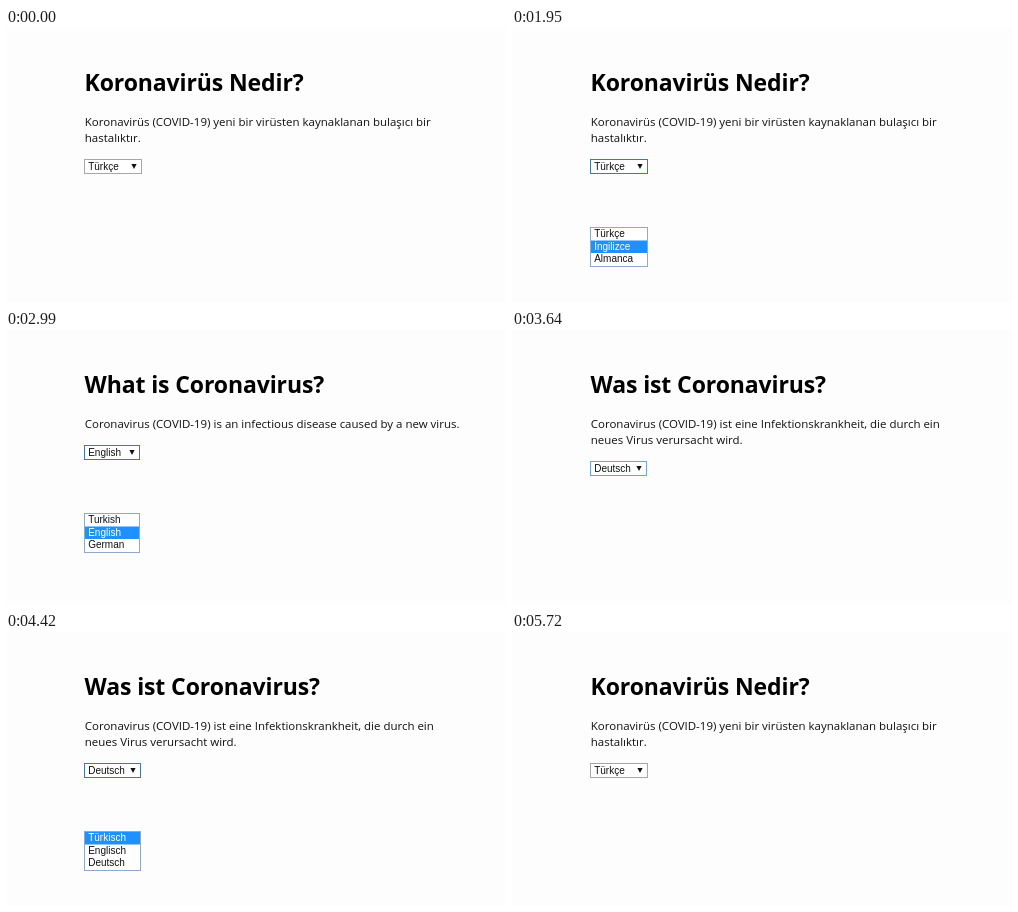
Animation, 500 px wide and 274 px high, one loop 5850 ms. Source, as an HTML page:

```html
<!DOCTYPE html>
<html lang="en">
<head>
<meta charset="utf-8">
<title>Language select</title>
<style>
html, body { margin: 0; width: 100%; height: 100%; overflow: hidden; background: #fdfdfd; }
svg { display: block; width: 500px; height: 274px; }
text { fill: #111; white-space: pre; }
.title { font: 700 23px "Open Sans", "Noto Sans", sans-serif; letter-spacing: -.11px; fill: #000; }
.body { font: 400 11.49px "Open Sans", "Noto Sans", sans-serif; }
.ui { font: 400 10px "Liberation Sans", Arial, sans-serif; }
</style>
</head>
<body>
<svg id="stage" viewBox="0 0 500 274"></svg>
<script>
const LOOP = 5850;
const PAGES = {
  tr: {
    title: 'Koronavirüs Nedir?',
    lines: ['Koronavirüs (COVID-19) yeni bir virüsten kaynaklanan bulaşıcı bir', 'hastalıktır.'],
    label: 'Türkçe', width: 57, options: ['Türkçe', 'İngilizce', 'Almanca']
  },
  en: {
    title: 'What is Coronavirus?',
    lines: ['Coronavirus (COVID-19) is an infectious disease caused by a new virus.'],
    label: 'English', width: 55, options: ['Turkish', 'English', 'German']
  },
  de: {
    title: 'Was ist Coronavirus?',
    lines: ['Coronavirus (COVID-19) ist eine Infektionskrankheit, die durch ein', 'neues Virus verursacht wird.'],
    label: 'Deutsch', width: 56, options: ['Türkisch', 'Englisch', 'Deutsch']
  }
};
const BORDER = { idle: '#a6a6a6', hover: '#595959', focus: '#6fa3e0', active: '#3f78b8' };

// [start ms, page, border, highlighted option if the list is open]
const STEPS = [
  [0, 'tr', 'idle'],
  [1300, 'tr', 'hover'],
  [1560, 'tr', 'active', 0],
  [1950, 'tr', 'active', 1],
  [2340, 'en', 'focus'],
  [2730, 'en', 'active'],
  [2860, 'en', 'active', 1],
  [3250, 'en', 'active', 2],
  [3640, 'de', 'focus'],
  [3770, 'de', 'active'],
  [4160, 'de', 'active', 2],
  [4290, 'de', 'active', 1],
  [4420, 'de', 'active', 0],
  [4810, 'tr', 'focus'],
  [5720, 'tr', 'idle']
];

const text = (cls, x, y, s, fill) =>
  `<text class="${cls}" x="${x}" y="${y}"${fill ? ` style="fill:${fill}"` : ''}>${s}</text>`;
const box = (x, y, w, h, fill, stroke = 'none') =>
  `<rect x="${x}" y="${y}" width="${w}" height="${h}" fill="${fill}" stroke="${stroke}"/>`;

function list(page, top, picked) {
  const row = 12.5;
  return box(78.5, top + .5, page.width, 39, '#fff', '#8fa9cc') +
    page.options.map((name, i) => {
      const y = top + 1 + i * row, on = i === picked;
      return (on ? box(79, y, page.width - 1, row, '#1e90ff') : '') +
        text('ui', 82.2, y + 9, name, on && '#fff');
    }).join('');
}

function draw([, key, border, picked]) {
  const page = PAGES[key];
  const top = 99 + 16 * page.lines.length;
  const ax = 78 + page.width - 7, ay = top + 5;
  return text('title', 78.5, 63, page.title) +
    page.lines.map((s, i) => text('body', 78.8, 98 + 16 * i, s)).join('') +
    box(78.5, top + .5, page.width, 14, '#fff', BORDER[border]) +
    text('ui', 82.2, top + 11, page.label) +
    `<path d="M${ax - 2.6} ${ay}h5.2l-2.6 5z" fill="#111"/>` +
    (picked === undefined ? '' : list(page, top + 68, picked));
}

const stage = document.getElementById('stage');
let shown;
function tick(now) {
  const t = now % LOOP;
  const step = STEPS.findLast(s => s[0] <= t);
  if (step !== shown) stage.innerHTML = draw(shown = step);
  requestAnimationFrame(tick);
}
tick(0);
</script>
</body>
</html>
```
